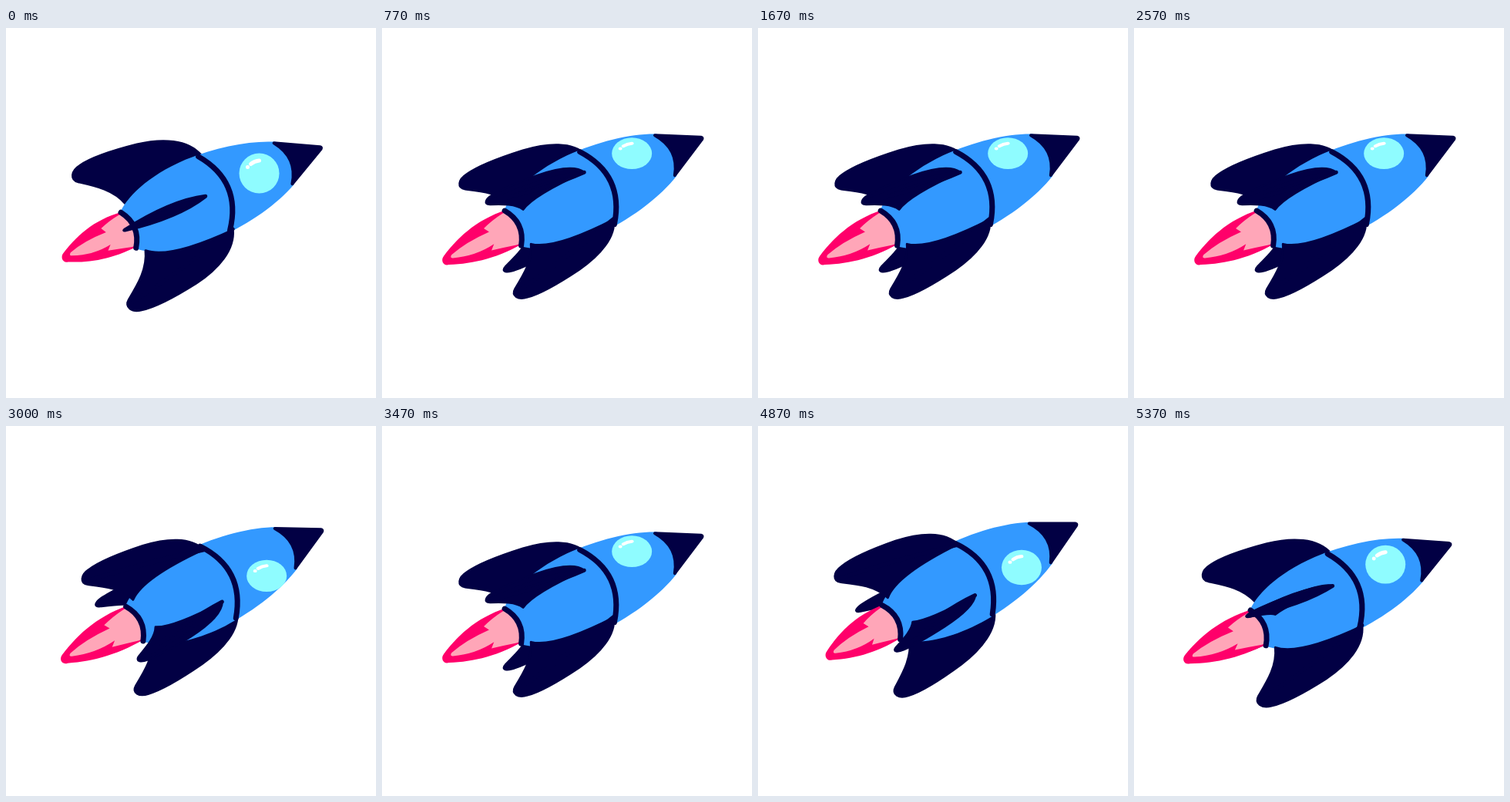
These frames come from a looping animation (480 by 480 pixels, 5.41 s). An HTML page:

```html
<!DOCTYPE html>
<html lang="en">
<head>
<meta charset="utf-8">
<title>Rocket</title>
<style>
  html, body { margin: 0; width: 100%; height: 100%; overflow: hidden; background: #fff; }
  svg { display: block; width: 480px; height: 480px; }
  .line { fill: none; stroke: #020044; stroke-linecap: round; }
  .fin path { fill: #020044; stroke: #020044; stroke-linejoin: round; stroke-linecap: round; }
  .blade { stroke-width: 3; vector-effect: non-scaling-stroke; }
  .spine { stroke-width: 5; }
</style>
</head>
<body>
<svg viewBox="0 0 480 480">
  <!-- Local axes: origin at the nozzle, x towards the nose. -->
  <g id="rocket">
    <g id="back"></g>
    <g id="flame">
      <path fill="#ff006a" d="M10 -24 C-30 -31 -60 -22 -89 -6 C-95 -3 -95 6 -88 7 C-60 20 -30 27 10 23 Z"/>
      <path fill="#ffa6b8" d="M10 -23 L-3 -23 Q-18 -21 -31 -16 L-27 -9 Q-58 -10 -80 -3 Q-84 0 -80 1.5 Q-54 12 -28 8 L-34 14 Q-18 18 -3 22 L10 22 Z"/>
    </g>
    <path fill="#3399ff" d="M0 -25 C14 -39 50 -55 105 -55 C150 -54 192 -45 222 -30 Q241 0 222 30 C192 45 150 54 105 55 C50 55 14 39 0 25 Q18 0 0 -25 Z"/>
    <path fill="#020044" stroke="#020044" stroke-width="4" stroke-linejoin="round"
      d="M219 -29.5 L272 -1.5 Q274 0 272 1.5 L220 28.5 Q240 0 219 -29.5 Z"/>
    <g id="window">
      <circle r="26" fill="#8ffcff"/>
      <path fill="none" stroke="#fff" stroke-width="5" stroke-linecap="round" d="M-15 -8 v.1 M-11 -12 Q-6 -16 0 -16.5"/>
    </g>
    <path class="line" stroke-width="7" d="M122 -52 Q161 0 122 52"/>
    <path class="line" stroke-width="7" d="M1 -25 Q18 0 1 25"/>
    <g id="front"></g>
  </g>
</svg>
<script>
const LOOP = 5410, STEP = 100 / 3, CYCLE = 27, LAST = 161;
const FIN = "M126 52 C118 78 88 92 55 98 C30 102 -5 106 -24 102 C-37 100 -43 90 -34 83 " +
            "C-16 70 4 56 11 33 C25 46 60 55 126 53 Z";
const $ = id => document.getElementById(id);
const rad = deg => deg * Math.PI / 180;
const set = (el, name, value) => el.setAttribute(name, value);

function makePath(parent, className) {
  const path = document.createElementNS("http://www.w3.org/2000/svg", "path");
  set(path, "class", className);
  return parent.appendChild(path);
}

const fins = [0, 90, 180, 270].map(offset => {
  const group = document.createElementNS("http://www.w3.org/2000/svg", "g");
  set(group, "class", "fin");
  const blade = makePath(group, "blade");
  set(blade, "d", FIN);
  return { offset, group, blade, spine: makePath(group, "spine") };
});

// Turns a fin around the rocket's axis; near fins are foreshortened along it.
function poseFin({ offset, group, blade, spine }, roll) {
  const angle = rad(roll + offset);
  const isNear = Math.cos(angle) > 0;
  const facing = Math.abs(Math.cos(angle)) ** 3;
  const lift = -Math.sin(angle);
  const shift = (isNear ? 22 : 8) * facing;
  const scale = isNear ? 1 - 0.3 * facing : 1;
  set(blade, "transform", `matrix(${scale} 0 0 ${lift} ${shift} 0)`);

  const tipX = -36 * scale + shift, tipY = 89 * lift;
  const rootX = 126 * scale + shift, rootY = 52 * lift;
  const midX = tipX * 0.38 + rootX * 0.62, midY = (tipY + rootY) / 2, bulge = 12 * facing;
  set(spine, "d", `M${tipX} ${tipY} Q${midX} ${midY - bulge} ${rootX} ${rootY} Q${midX} ${midY + bulge} ${tipX} ${tipY} Z`);
  set(spine, "visibility", isNear ? "visible" : "hidden");

  const layer = isNear ? $("front") : $("back");
  if (group.parentNode !== layer) layer.appendChild(group);
}

function draw(time) {
  const frame = Math.min(LAST, Math.floor((time % LOOP + 4) / STEP)) % CYCLE;
  const wave = (peak, count = 1) => Math.cos(2 * Math.PI * count * (frame - peak) / CYCLE);

  const tailX = 168.2 + 13.4 * wave(16.5), tailY = 258.3 - 4.5 * wave(14.5);
  const noseX = 413.6 + 9 * wave(19), noseY = 137.7 - 18.5 * wave(15.5);
  const pitch = Math.atan2(noseY - tailY, noseX - tailX) * 180 / Math.PI;
  set($("rocket"), "transform", `translate(${tailX} ${tailY}) rotate(${pitch})`);

  const flicker = wave(2, 8);
  set($("flame"), "transform", `scale(${(98.5 + 7.5 * flicker) / 93} 1)`);

  const roll = 34 * wave(20.65) + 2.2 * flicker;
  fins.forEach(fin => poseFin(fin, roll));

  const windowX = 155 + 31 * Math.cos(rad(roll)), windowY = -43 * Math.sin(rad(roll));
  const squash = Math.cos(rad(roll * 1.3));
  set($("window"), "transform", `translate(${windowX} ${windowY}) rotate(${-pitch}) scale(1 ${squash})`);
}

function tick() {
  draw(performance.now());
  requestAnimationFrame(tick);
}
tick();
</script>
</body>
</html>
```
